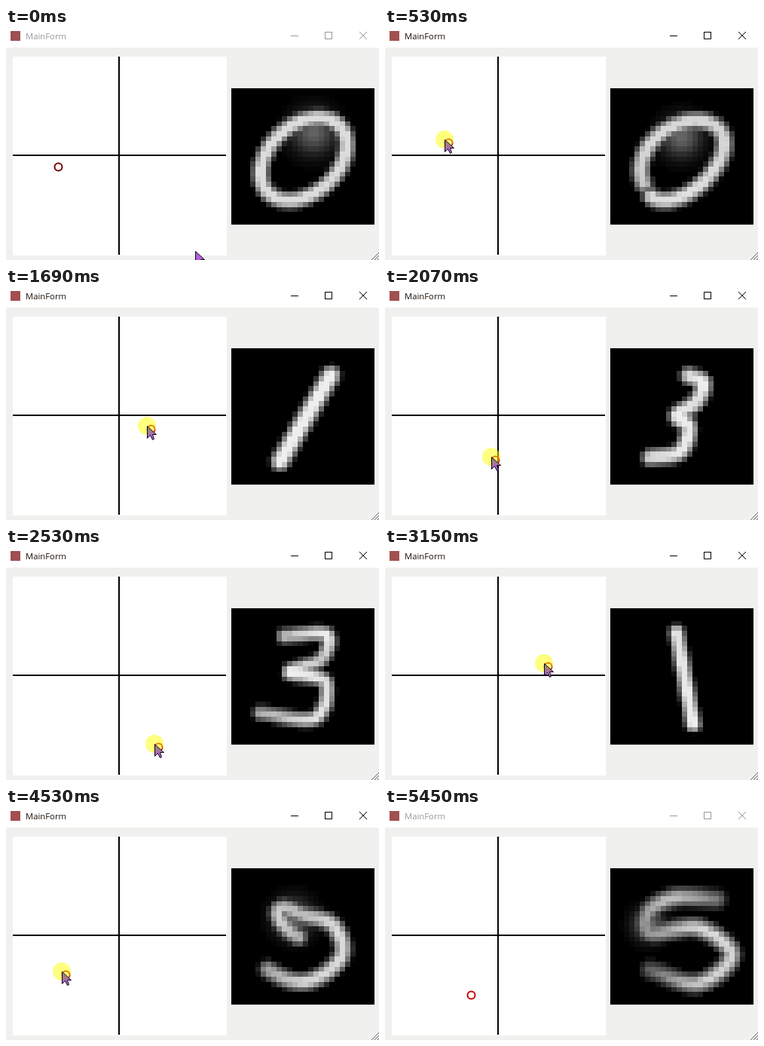
Write an HTML page with a canvas that moves like this. It is 495 px wide and 308 px high and loops after 5530 ms.

```html
<!DOCTYPE html>
<html>
<head>
<meta charset="utf-8">
<style>
html, body { margin: 0; width: 100%; height: 100%; overflow: hidden; background: #f0f0ee; }
canvas { display: block; }
</style>
</head>
<body>
<canvas id="stage" width="495" height="308"></canvas>
<script>
const ctx = document.getElementById('stage').getContext('2d');
const LOOP = 5530, STEP = 76.88;
const PRESS = 380, RELEASE = 4800, BLUR = 5450;

const lerp = (a, b, f) => a + (b - a) * f;
const mix = (p, q, f) => p.map((v, n) => lerp(v, q[n], f));
const clamp = (v, lo = 0, hi = 1) => Math.max(lo, Math.min(hi, v));

// Keys are [time, ...values]; returns the segment and the part of it that has passed
function locate(keys, t) {
  let i = 0;
  while (i < keys.length - 2 && keys[i + 1][0] <= t) i++;
  const a = keys[i][0], b = keys[i + 1][0];
  return [i, clamp((t - a) / (b - a))];
}

// Smooth Hermite curve through the keys
function curve(keys, t) {
  const [i, f] = locate(keys, t), a = keys[i], b = keys[i + 1];
  const slope = (j, n) => {
    const p = keys[Math.max(0, j - 1)], q = keys[Math.min(keys.length - 1, j + 1)];
    return (q[n] - p[n]) / (q[0] - p[0]) * (b[0] - a[0]);
  };
  const ease = f * f * (3 - 2 * f);
  return a.map((v, n) => lerp(v, b[n], ease) +
    f * (1 - f) * ((1 - f) * slope(i, n) - f * slope(i + 1, n))).slice(1);
}

// Pointer: a hand-drawn spiral
const path = [
  [0, 251, 296], [230, 130, 245], [PRESS, 64, 180], [610, 95, 138], [1070, 170, 117],
  [1380, 203, 146], [1690, 187, 183], [2150, 137, 232], [2460, 172, 263], [2530, 197, 260],
  [2840, 217, 205], [3150, 211, 153], [3460, 148, 92], [3690, 84, 86], [3920, 50, 112],
  [4300, 49, 190], [RELEASE, 109, 244], [4920, 118, 269]
];
const pointer = (t) => curve(path, t).map(Math.round);

// A glyph is a stroke at(u) = [x, y, light] with a shape:
// radius, softness, grit, then haze x, y, size, strength
const noHaze = [400, 160, 20, 0];
function stroke(points, radius, soft, grit = 0, haze = noHaze) {
  const keys = points.map((p, i) => [i / (points.length - 1), ...p]);
  return { at: (u) => curve(keys, u), shape: [radius, soft, grit, ...haze] };
}
// Slanted oval from its lower left, clockwise for turn = -1
function oval(turn) {
  const at = (u) => {
    const a = 3.6 + turn * u * 2 * Math.PI;
    return [395 + 57 * Math.cos(a), 174 - 55 * Math.sin(a + .35), .88];
  };
  return { at, shape: [15, 11, 0, 408, 138, 28, .4] };
}

const seven = stroke([[341, 178, .5], [355, 151, .8], [405, 136, .75], [445, 138, .75],
  [416, 200, .95], [386, 260, .85]], 18, 14, 0, [340, 168, 18, .45]);
const three = stroke([[369, 117, .75], [425, 115, .95], [418, 148, .8], [376, 165, .95],
  [424, 178, .9], [410, 226, .9], [338, 219, .7]], 14, 11);
const broken = stroke([[385, 201, .2], [340, 198, .55], [342, 153, .95], [385, 134, .4],
  [428, 142, .8], [449, 185, .45], [441, 214, .95], [453, 260, .95]], 15, 11, .45,
  [391, 126, 14, .4]);
const five = stroke([[352, 215, .4], [415, 233, .8], [460, 195, .85], [415, 159, .85],
  [352, 166, .6], [350, 138, .65], [385, 119, .75], [440, 121, .5]], 17, 14, 0,
  [350, 155, 20, .45]);

const digits = [
  [0, oval(-1)], [PRESS, oval(-1)], [1070, seven],
  [1690, stroke([[431, 116, .95], [364, 230, .95]], 17, 12)],
  [2530, three],
  [3150, stroke([[387, 112, .9], [409, 234, .95]], 14, 10)],
  [3920, broken], [4300, oval(-1)], [4300, oval(1)], [RELEASE, five], [LOOP, five]
];

const noise = (n) => {
  const s = Math.sin(n * 12.9898) * 43758.5453;
  return s - Math.floor(s);
};
const edgeX = (n) => Math.round(295.5 + n * 190 / 27);
const edgeY = (n) => Math.round(76.65 + n * 181 / 27);

function drawDigit(t) {
  const [i, f] = locate(digits, t);
  const a = digits[i][1], b = digits[i + 1][1];
  const [radius, soft, grit, hx, hy, size, strength] = mix(a.shape, b.shape, f);
  const samples = [];
  for (let n = 0; n <= 70; n++) samples.push(mix(a.at(n / 70), b.at(n / 70), f));

  ctx.save();
  ctx.beginPath();
  ctx.rect(299, 80, 190, 181);
  ctx.clip();
  rect('#000', 299, 80, 190, 181);
  for (let row = 0; row < 28; row++) {
    for (let col = 0; col < 28; col++) {
      const x = edgeX(col), y = edgeY(row), w = edgeX(col + 1) - x, h = edgeY(row + 1) - y;
      const cx = x + w / 2, cy = y + h / 2;
      let v = strength * Math.exp(-((cx - hx) ** 2 + (cy - hy) ** 2) / size ** 2);
      for (const [sx, sy, light] of samples) {
        v = Math.max(v, light * clamp((radius - Math.hypot(cx - sx, cy - sy)) / soft));
      }
      const g = Math.round(250 * clamp(v * (1 - grit * noise(row * 28 + col))));
      if (g > 3) rect(`rgb(${g},${g},${g})`, x, y, w, h);
    }
  }
  ctx.restore();
}

function rect(color, x, y, w, h) {
  ctx.fillStyle = color;
  ctx.fillRect(x, y, w, h);
}
function lines(color, ...list) {
  ctx.strokeStyle = color;
  ctx.lineWidth = 1;
  ctx.beginPath();
  for (const [x1, y1, x2, y2] of list) {
    ctx.moveTo(x1, y1);
    ctx.lineTo(x2, y2);
  }
  ctx.stroke();
}
function circle(x, y, r) {
  ctx.beginPath();
  ctx.arc(x, y, r, 0, 2 * Math.PI);
}

function drawWindow(active) {
  rect('#f0f0ee', 0, 0, 495, 308);
  rect('#fff', 0, 0, 495, 26);
  rect('#a05050', 6, 4, 13, 13);
  const ink = active ? '#000' : '#999';
  ctx.fillStyle = active ? '#1c1008' : '#999';
  ctx.font = '11.3px "Open Sans", "Noto Sans", sans-serif';
  ctx.fillText('MainForm', 26, 15);
  lines(ink, [378, 10.5, 388, 10.5], [469, 5, 479, 15], [479, 5, 469, 15]);
  ctx.strokeRect(423.5, 5.5, 9, 9);
  lines('#666', [485, 308, 495, 298], [489, 308, 495, 302], [493, 308, 495, 306]);
  rect('#fff', 9, 38, 284, 264);
  rect('#000', 149, 38, 2, 263);
  rect('#000', 9, 168, 283, 2);
}

function drawCursor(x, y, pressed) {
  ctx.save();
  ctx.translate(x, y);
  const fill = ctx.createLinearGradient(0, 7, 0, 15);
  fill.addColorStop(0, pressed ? '#a08080' : '#b060dc');
  fill.addColorStop(1, '#b060dc');
  ctx.fillStyle = fill;
  ctx.strokeStyle = '#100818';
  ctx.lineWidth = 1;
  ctx.beginPath();
  for (const [px, py] of [[0, 0], [0, 16], [4, 12], [7, 18], [9, 17], [7, 11], [12, 11]]) {
    ctx.lineTo(px + .5, py + .5);
  }
  ctx.closePath();
  ctx.fill();
  ctx.stroke();
  ctx.restore();
}

function draw(t) {
  const pressed = t >= PRESS && t <= RELEASE;
  drawWindow(t >= PRESS && t < BLUR);
  drawDigit(t);

  const [rx, ry] = pointer(clamp(t, PRESS, RELEASE));
  ctx.strokeStyle = t < PRESS ? '#780000' : '#c80000';
  ctx.lineWidth = 2;
  circle(rx + 5.5, ry + 4.5, 5);
  ctx.stroke();

  if (t >= BLUR) return;
  const [x, y] = pointer(t);
  if (pressed) {
    ctx.fillStyle = 'rgba(255,255,0,.5)';
    circle(x, y, 12);
    ctx.fill();
  }
  drawCursor(x, y, pressed);
}

// The picture advances in fixed steps rounded down to 10 ms
const stepStart = (k) => Math.floor(k * STEP / 10) * 10;
let shown = -1;
function tick() {
  const t = performance.now() % LOOP;
  let k = Math.floor(t / STEP);
  if (stepStart(k + 1) <= t) k++;
  if (k !== shown) draw(stepStart(shown = k));
  requestAnimationFrame(tick);
}
tick();
</script>
</body>
</html>
```
